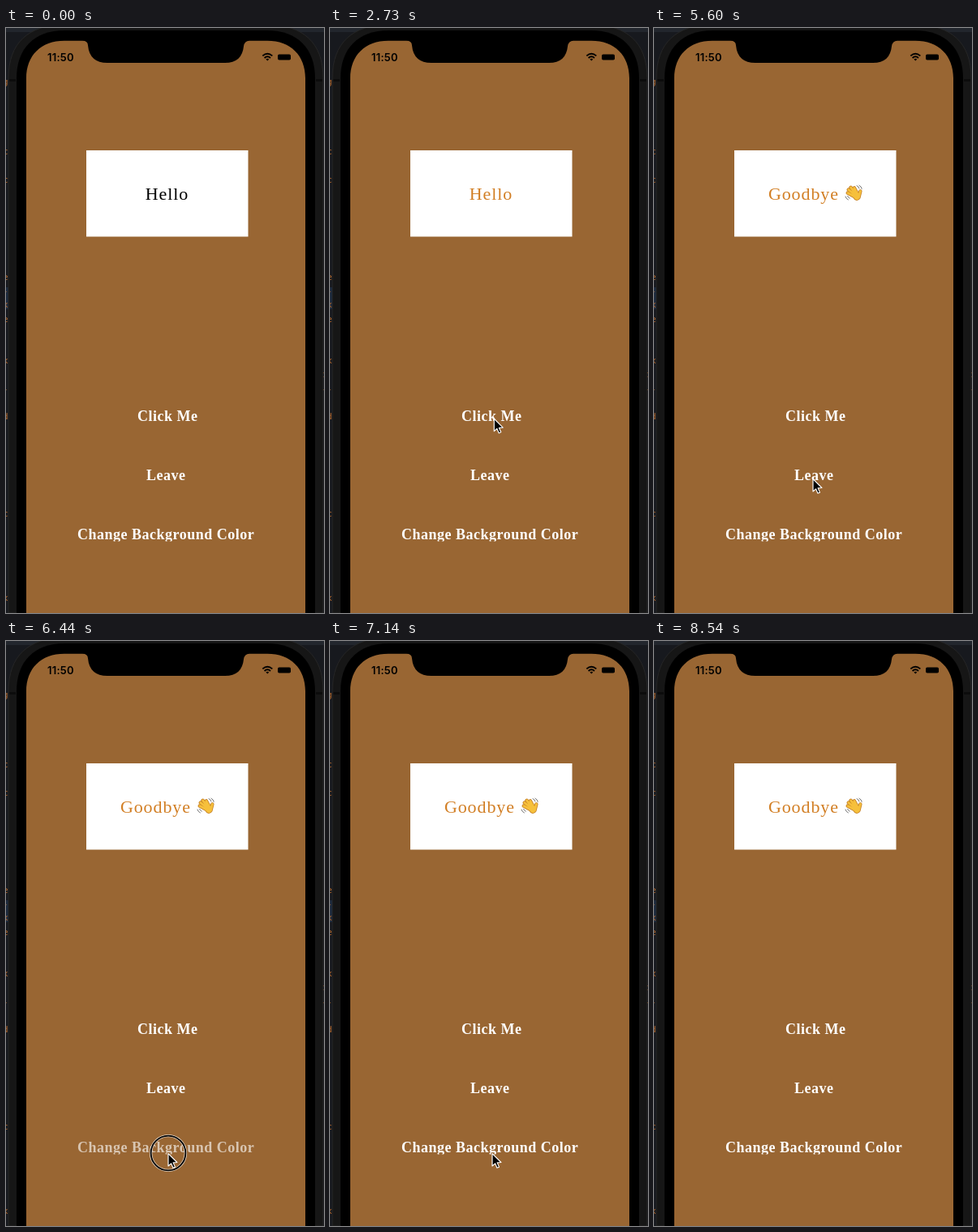
These frames come from a looping animation (392x722 px, 9310 ms). An HTML page:

```html
<!DOCTYPE html>
<html lang="en">
<head>
<meta charset="utf-8">
<title>Hello button demo</title>
<style>
  html, body { margin: 0; width: 100%; height: 100%; overflow: hidden; background: #17191e; }
  svg { display: block; width: 392px; height: 722px; }
  .label { font: 22px "Liberation Serif", serif; letter-spacing: .9px; text-anchor: middle; fill: #d27f25; }
  .button { font: bold 18px "Liberation Serif", serif; letter-spacing: .5px; text-anchor: middle; fill: #fff; }
  .clock { font: 600 13px Inter, sans-serif; letter-spacing: .2px; }
  .code { font: 11px "DejaVu Sans Mono", monospace; fill: #b5692c; }
  .screen { fill: #996633; }
  .cyan .button { fill: #e4ffff; }
  .cyan .code { fill: #777; }
  .cyan .screen { fill: #0ff; stroke: #a8ffff; stroke-width: .8px; }
  .full, .cyan .plain { visibility: hidden; }
  .cyan .full { visibility: visible; }
</style>
</head>
<body>
<svg id="stage" viewBox="0 0 392 722">
  <defs>
    <clipPath id="trim"><rect x="80" y="600" width="240" height="33.5"/></clipPath>
    <clipPath id="edges"><path d="M0 0H3V722H0ZM390.5 0H392V722H390.5Z"/></clipPath>
    <path id="hand" d="M247 208L238.8 203.6M248 206L239.8 199.6M249 205L242.6 196.8M251 205L246.8 197.4M252.5 209L254.3 201.4M247 208Q250 213 252.5 209L250 205Z"/>
  </defs>

  <rect width="392" height="722" fill="#17191e"/>
  <path d="M0 0H392V5H0Z" fill="#22262d"/>
  <path d="M0 320H3V347H0Z" fill="#1c2a3e"/>
  <g id="code" class="code" clip-path="url(#edges)"></g>

  <path d="M3 722V62C3 18 28 -4 72 -4H322C366 -4 391 18 391 62V722Z" fill="#161616" stroke="#262626"/>
  <path d="M4 64.5H12M382 64.5H390" stroke="#0c0c0c" stroke-width="3"/>
  <path d="M13 722V62C13 25 35 3 72 3H322C359 3 381 25 381 62V722Z"/>
  <path class="screen" d="M25 723V62C25 34 43 15.7 72 15.7H94Q101 15.7 101 21.5Q103 43 125 43H270Q291 43 293 22.5Q294 15.7 300 15.7H322C351 15.7 369 34 369 62V723Z"/>

  <text class="clock" x="51" y="41">11:50</text>
  <path class="full" d="M297.5 39H312" stroke="#4aa" stroke-width="2" stroke-dasharray="2"/>
  <g fill="none" stroke="#000" stroke-width="1.9">
    <path d="M316.3 34.4Q322.3 29 328.3 34.4M318.6 37Q322.3 33.6 326 37"/>
    <path d="M322.3 40.6L320.4 38.6Q322.3 37 324.2 38.6Z" fill="#000" stroke="none"/>
  </g>
  <rect class="plain" x="335" y="32.4" width="16" height="7.2" rx="1.8"/>
  <g class="full">
    <rect x="334" y="32" width="18" height="8.4" rx="2.4" fill="none" stroke="#067" stroke-width=".8"/>
    <rect x="335.4" y="33.2" width="15.2" height="6" rx="1.2"/>
    <path d="M353.4 34.6Q355 36.2 353.4 37.8Z" fill="#067"/>
  </g>

  <rect x="99" y="151" width="199.5" height="106.5" fill="#fff"/>
  <text id="hello" class="label" x="198.4" y="212">Hello</text>
  <g id="bye">
    <text class="label" x="184.4" y="212">Goodbye</text>
    <g fill="none" stroke-linecap="round" stroke-linejoin="round">
      <use href="#hand" stroke="#c58128" stroke-width="4.4"/>
      <use href="#hand" fill="#f6c03c" stroke="#f6c03c" stroke-width="2.8"/>
      <path d="M250 194.6Q252.6 195.6 253 198M253 194.2Q255.8 195.6 256.2 198.4M236 208Q236.6 211 239.4 212M238.6 207.4Q239.2 209.4 241.2 210.2" stroke="#666" stroke-width=".9"/>
    </g>
  </g>

  <text class="button" x="199.2" y="485">Click Me</text>
  <text class="button" x="197.2" y="558">Leave</text>
  <g clip-path="url(#trim)"><text class="button" x="197.2" y="630.5">Change Background Color</text></g>

  <g id="pointer">
    <g id="ring" fill="none">
      <circle r="21.4" stroke="#fff" stroke-opacity=".7" stroke-width="3.4"/>
      <circle r="21.4" stroke="#000" stroke-width="1.8"/>
    </g>
    <path transform="translate(0 .6) scale(.94)" d="M0 0V16.4L3.8 13L6.3 18.8L9 17.6L6.5 12L11.6 11.6Z" stroke="#fff" stroke-width="1.2" stroke-linejoin="round"/>
  </g>
</svg>
<script>
  const LOOP = 9310, STEP = 70;
  const $ = id => document.getElementById(id);
  const buttons = document.querySelectorAll('.button');
  const show = (id, on) => $(id).style.visibility = on ? 'visible' : 'hidden';

  // pointer moves: start, duration, end x, end y
  const moves = [
    [0, 770, 203, 478],
    [2660, 1540, 195, 519],
    [4200, 700, 196, 556],
    [5880, 210, 200, 632],
    [8260, 280, 204, 726]
  ];

  // presses per button: down, up
  const presses = [
    [[1680, 2310]],
    [[5040, 5600]],
    [[6230, 6580], [7000, 7140], [7420, 7560], [7770, 8050]]
  ];

  const releases = (button, t) => presses[button].filter(([, up]) => t >= up).length;
  const isDown = (button, t) => presses[button].some(([down, up]) => t >= down && t < up);

  function pointerAt(t) {
    let x = 216, y = 726;
    for (const [start, span, toX, toY] of moves) {
      const k = Math.min(1, Math.max(0, (t - start) / span));
      const eased = k * (2 - k);
      x += (toX - x) * eased;
      y += (toY - y) * eased;
    }
    return [x, y];
  }

  // slivers of code lines beside the phone
  function addCode() {
    let seed = 7;
    const random = () => (seed = seed * 16807 % 2147483647) / 2147483647;
    let html = '';
    for (let y = 53; y < 722; y += 17.2) {
      const glyph = 'xgedc-'[Math.floor(random() * 6)];
      if (random() < .35) html += `<text x="-4" y="${y}">${glyph}</text>`;
      if (y > 400 && y < 580 && random() < .4) html += `<text x="389" y="${y}">${glyph}</text>`;
    }
    $('code').innerHTML = html;
  }

  function draw(t) {
    const down = presses.map((_, i) => isDown(i, t));
    buttons.forEach((b, i) => b.style.opacity = down[i] ? .62 : 1);
    show('ring', down.includes(true));
    $('stage').classList.toggle('cyan', releases(2, t) % 2 === 1);
    $('hello').style.fill = releases(0, t) ? '' : '#000';
    show('hello', !releases(1, t));
    show('bye', releases(1, t));
    $('pointer').setAttribute('transform', `translate(${pointerAt(t)})`);
  }

  const start = performance.now();
  function tick() {
    const t = Math.max(0, performance.now() - start) % LOOP;
    draw(Math.floor(t / STEP) * STEP);
    requestAnimationFrame(tick);
  }
  addCode();
  tick();
</script>
</body>
</html>
```
